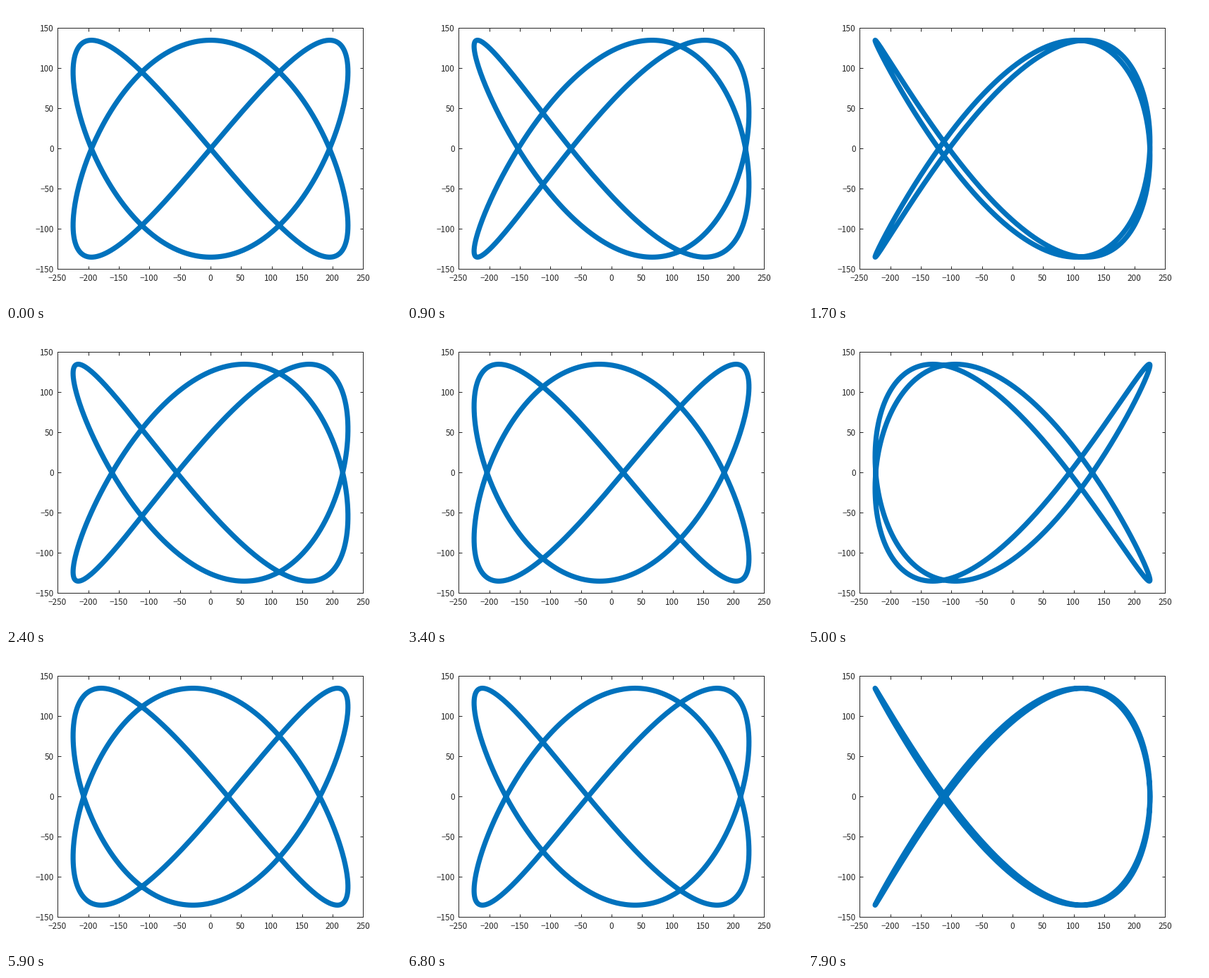
Animation of 560 by 420 pixels, one loop 8000 ms. Source, as a matplotlib script:

```python
import numpy as np
import matplotlib.pyplot as plt
from matplotlib.animation import FuncAnimation

W, H, DPI = 560, 420, 100
PX = 72 / DPI  # one pixel in points
# Just below the half pixel, so the box snaps to columns 73, 506 and rows 31, 373
LEFT, RIGHT, TOP, BOTTOM = 73.45, 506.45, 31.45, 373.45
FRAMES, INTERVAL = 80, 100
INK, BLUE = "#262626", "#0072BD"

fig = plt.figure(figsize=(W / DPI, H / DPI), dpi=DPI, facecolor="white")
ax = fig.add_axes([LEFT / W, 1 - BOTTOM / H, (RIGHT - LEFT) / W, (BOTTOM - TOP) / H])
ax.set(xlim=(-250, 250), ylim=(-150, 150),
       xticks=range(-250, 251, 50), yticks=range(-150, 151, 50))
ax.tick_params(direction="in", length=4.5 * PX, width=PX, color=INK,
               top=True, right=True, labelbottom=False, labelleft=False)
for spine in ax.spines.values():
    spine.set(linewidth=PX, color=INK)


def label(value, xy, shift, ha):
    ax.annotate(str(value).replace("-", "\u2212"), xy,
                xytext=(shift[0] * PX, shift[1] * PX), textcoords="offset points",
                ha=ha, va="baseline", color=INK, fontsize=11.7 * PX,
                family="Noto Sans CJK JP", annotation_clip=False)


for x in range(-250, 251, 50):
    label(x, (x, -150), (-0.5, -16.5), "center")
for y in range(-150, 151, 50):
    label(y, (-250, y), (-5.5, -4.5), "right")

t = np.linspace(0, 2 * np.pi, 1201)
curve, = ax.plot([], [], color=BLUE, linewidth=7.2 * PX,
                 solid_joinstyle="round", solid_capstyle="round")


def draw(i):
    curve.set_data(225 * np.sin(2 * t - i / 30), 135 * np.sin(3 * t))
    return curve,


anim = FuncAnimation(fig, draw, frames=FRAMES, interval=INTERVAL,
                     repeat=True, repeat_delay=0)
plt.show()
```
